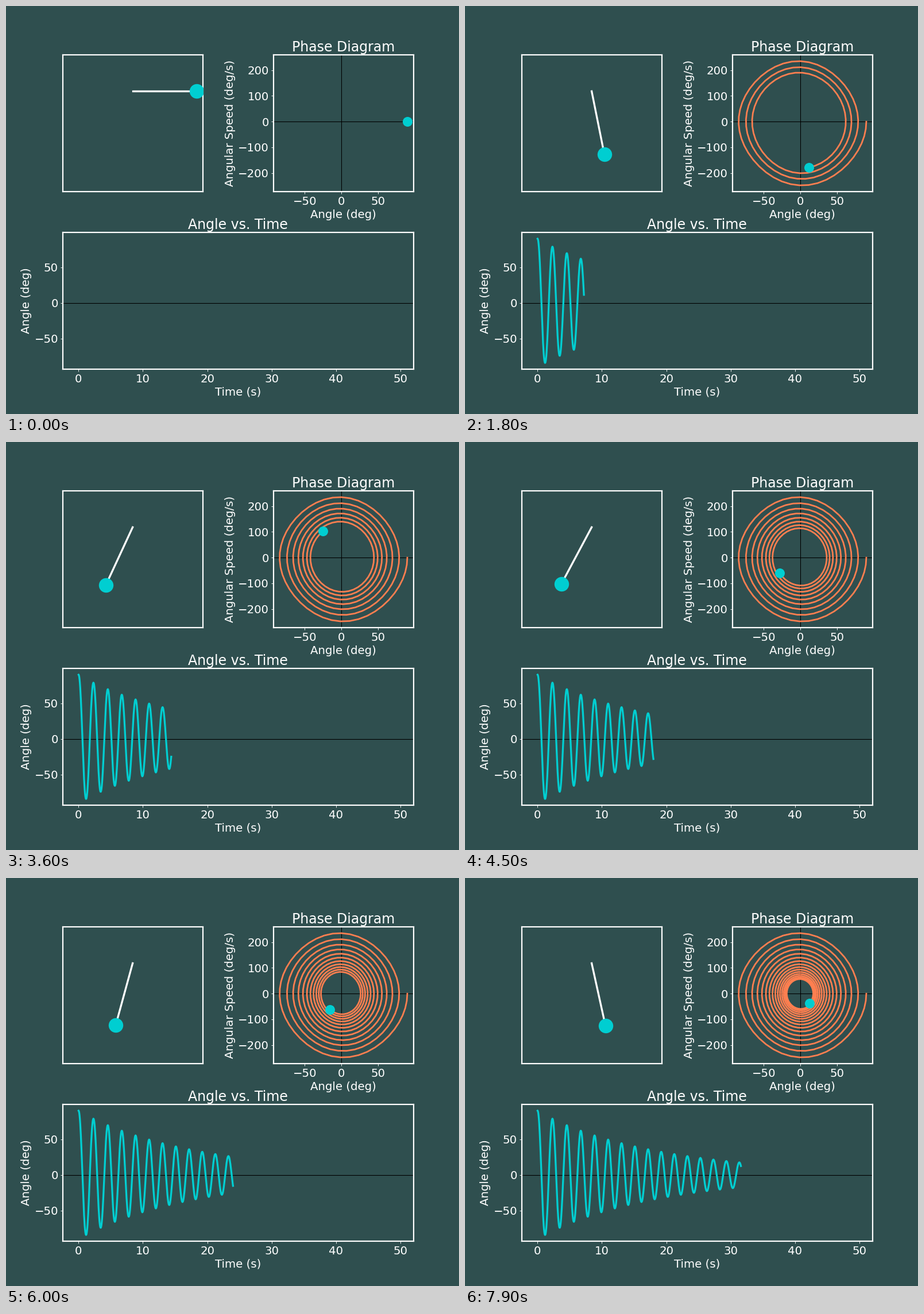
A matplotlib script that plays this animation: 789x710 px, repeating every 8000 ms.

```python
import numpy as np
import matplotlib.pyplot as plt
from matplotlib.animation import FuncAnimation

W, H, DPI = 789, 710, 64
K = 78.9 / DPI                      # layout is designed at 78.9 dpi
FRAMES, INTERVAL, STRIDE = 80, 100, 8
G, DAMPING, DT, STEPS = 9.89, 0.1, 0.05, 992

BG, CYAN, CORAL = "darkslategray", "darkturquoise", "coral"

plt.rcParams.update({
    "font.family": "DejaVu Sans", "font.size": 18 * K,
    "text.color": "white", "axes.labelcolor": "white",
    "axes.edgecolor": "white", "axes.facecolor": BG,
    "axes.linewidth": 2 * K, "axes.titlepad": 6 * K, "axes.labelpad": 4 * K,
    "xtick.color": "white", "ytick.color": "white",
    "xtick.major.size": 3.5 * K, "ytick.major.size": 3.5 * K,
    "xtick.major.width": 0.8 * K, "ytick.major.width": 0.8 * K,
    "xtick.major.pad": 3.5 * K, "ytick.major.pad": 3.5 * K,
})


def slope(s):
    return np.array([s[1], -G * np.sin(s[0]) - DAMPING * s[1]])


def simulate():
    """Damped pendulum released at rest from 90 degrees (RK4)."""
    states = [np.array([np.pi / 2, 0.0])]
    for _ in range(STEPS):
        s = states[-1]
        k1 = slope(s)
        k2 = slope(s + DT / 2 * k1)
        k3 = slope(s + DT / 2 * k2)
        k4 = slope(s + DT * k3)
        states.append(s + DT / 6 * (k1 + 2 * k2 + 2 * k3 + k4))
    return np.array(states).T


def padded(values):
    lo, hi = values.min(), values.max()
    pad = 0.05 * (hi - lo)
    return lo - pad, hi + pad


def dot(ax, diameter):
    size = diameter * 72 / DPI
    return ax.plot([], [], "o", color=CYAN, ms=size, mew=0, zorder=3)[0]


def curve(ax, color, width):
    return ax.plot([], [], color=color, lw=width * K, zorder=2)[0]


theta, omega = simulate()
time = np.arange(STEPS + 1) * DT
angle, speed = np.degrees(theta), np.degrees(omega)
x, y = np.sin(theta), -np.cos(theta)

fig = plt.figure(figsize=(W / DPI, H / DPI), dpi=DPI, facecolor=BG)
grid = fig.add_gridspec(2, 2, left=0.125, right=0.9, bottom=0.11, top=0.88,
                        wspace=0.5, hspace=0.3)
ax_pend = fig.add_subplot(grid[0, 0])
ax_phase = fig.add_subplot(grid[0, 1])
ax_time = fig.add_subplot(grid[1, :])

# Pendulum: equal scale on both axes, centred on the half length
box = ax_pend.get_position()
x0, x1 = padded(x)
half = (x1 - x0) / 2 * (box.height * H) / (box.width * W)
ax_pend.set(xlim=(x0, x1), ylim=(-0.5 - half, -0.5 + half), xticks=[], yticks=[])
rod = curve(ax_pend, "white", 3)
bob = dot(ax_pend, 25.4)

ax_phase.set(title="Phase Diagram", xlabel="Angle (deg)",
             ylabel="Angular Speed (deg/s)",
             xticks=[-50, 0, 50], yticks=range(-200, 201, 100),
             xlim=padded(angle), ylim=padded(speed))
ax_phase.axhline(0, color="black", lw=K, zorder=1)
ax_phase.axvline(0, color="black", lw=K, zorder=1)
orbit = curve(ax_phase, CORAL, 2.5)
marker = dot(ax_phase, 17)

ax_time.set(title="Angle vs. Time", xlabel="Time (s)", ylabel="Angle (deg)",
            xticks=range(0, 51, 10), yticks=[-50, 0, 50],
            xlim=padded(time), ylim=padded(angle))
ax_time.axhline(0, color="black", lw=K, zorder=1)
trace = curve(ax_time, CYAN, 3)


def update(frame):
    i = frame * STRIDE
    past = slice(0, i + 1)
    rod.set_data([0, x[i]], [0, y[i]])
    bob.set_data([x[i]], [y[i]])
    orbit.set_data(angle[past], speed[past])
    marker.set_data([angle[i]], [speed[i]])
    trace.set_data(time[past], angle[past])
    return rod, bob, orbit, marker, trace


anim = FuncAnimation(fig, update, frames=FRAMES, interval=INTERVAL,
                     repeat=True, repeat_delay=0)
plt.show()
```
